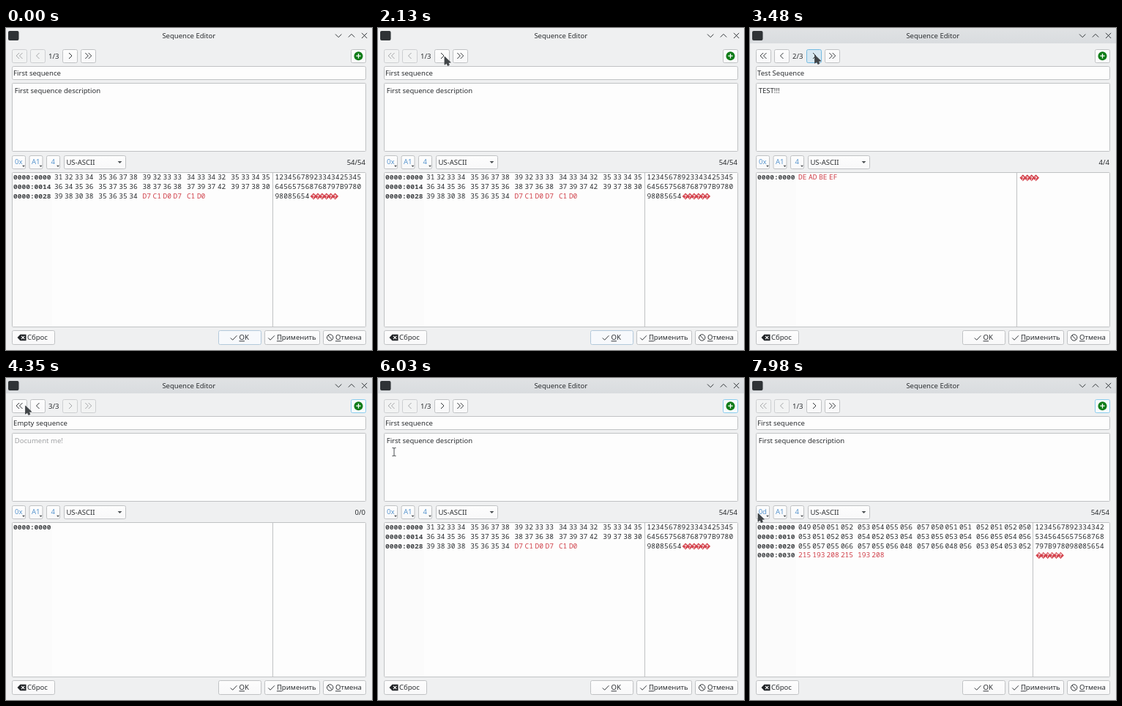
Write an HTML page that moves like this. It is 500x440 px and loops after 8 s.

```html
<!DOCTYPE html>
<html lang="ru">
<head>
<meta charset="utf-8">
<title>Sequence Editor</title>
<style>
html, body { margin: 0; width: 100%; height: 100%; overflow: hidden; background: #eff0f1; }
svg { display: block; width: 500px; height: 440px; }
text { font: 9.54px "Noto Sans", sans-serif; fill: #2b2e31; white-space: pre; }
.mono { font-family: "Noto Sans Mono", monospace; }
.bold { font-weight: 600; fill: #404346; }
.tool { fill: #5b97cf; }
.bad { fill: #cf3f49; }
.hint { fill: #a0a2a4; }
.u { text-decoration: underline; }
.line { fill: none; stroke: #33373a; stroke-width: 1; }
</style>
</head>
<body>
<svg id="stage" viewBox="0 0 500 440">
  <defs>
    <linearGradient id="bar" x1="0" y1="0" x2="0" y2="1">
      <stop offset="0" stop-color="#e0e2e4"/><stop offset="1" stop-color="#d9dcdf"/>
    </linearGradient>
    <linearGradient id="face" x1="0" y1="0" x2="0" y2="1">
      <stop offset="0" stop-color="#fdfdfd"/><stop offset="1" stop-color="#f8f8f9"/>
    </linearGradient>
  </defs>
  <g id="view"></g>
  <g id="arrow"><path d="M0 0V11.2L2.7 9.2 4.3 12.5 6.4 11.6 5 8.4 8.3 8Z" fill="#414548" stroke="#414548" stroke-width=".8" stroke-linejoin="round"/></g>
  <g id="beam"><path d="M-2.5 -5.5H-1Q0 -5.5 0 -4.5Q0 -5.5 1 -5.5H2.5M0 -4.5V4.5M-2.5 5.5H-1Q0 5.5 0 4.5Q0 5.5 1 5.5H2.5" fill="none" stroke="#4b4f52"/></g>
</svg>
<script>
const LOOP = 8000;
const $ = id => document.getElementById(id);
const bytes = s => [...s].map(c => c.charCodeAt(0));

const pages = [
  { name: 'First sequence', note: 'First sequence description',
    data: [...bytes('12345678923343425345' + '645657568768797B9780' + '98085654'),
           0xD7, 0xC1, 0xD0, 0xD7, 0xC1, 0xD0] },
  { name: 'Test Sequence', note: 'TEST!!!', data: [0xDE, 0xAD, 0xBE, 0xEF] },
  { name: 'Empty sequence', note: '', data: [] }
];

const modes = {
  hex: { label: '0x', base: 16, digits: 2, row: 20, cell: 14, group: 60.3, split: 364.5 },
  dec: { label: '0d', base: 10, digits: 3, row: 16, cell: 19.3, group: 81, split: 386.5 }
};

const text = (x, y, s, cls = '', anchor = 'start') =>
  `<text x="${x}" y="${y}" class="${cls}" text-anchor="${anchor}">${s}</text>`;
const line = (d, extra = '') => `<path class="line" d="${d}" ${extra}/>`;
const box = (x, y, w, h, fill, stroke, r = 2) =>
  `<rect x="${x + .5}" y="${y + .5}" width="${w}" height="${h}" rx="${r}" fill="${fill}" stroke="${stroke}"/>`;

function button(x, y, w, h, look = '') {
  const [fill, stroke] = {
    off: ['#f2f3f3', '#cdcfd1'],
    hot: ['#d7e8f2', '#74bbe2'],
    focus: ['#f6fafc', '#8accee'],
    main: ['#f7f9fc', '#b3c9db']
  }[look] || ['url(#face)', '#c0c2c4'];
  return box(x, y, w, h, fill, stroke);
}

// One or two chevrons; dir is -1 for left, 1 for right.
function chevrons(cx, dir, count, off) {
  let d = '';
  for (let i = 0; i < count; i++) {
    const x = cx + (count > 1 ? (i - .5) * 4.4 : 0);
    d += `M${x - 2 * dir} 34l${4 * dir} 4l${-4 * dir} 4`;
  }
  return line(d, off ? 'style="stroke:#a5a7a9"' : '');
}

function titleBar(active) {
  return `<rect width="500" height="440" fill="#eff0f1"/>` +
    `<rect width="500" height="21" fill="${active ? 'url(#bar)' : '#eff0f1'}"/>` +
    `<rect x="3" y="4" width="14.5" height="13" rx="2" fill="#2f3336"/>` +
    text(249.8, 14, 'Sequence Editor', '', 'middle') +
    line('M450 8.5l4.2 4.2 4.2-4.2M467.8 12.5l4.2-4.2 4.2 4.2M486 6.8l7.2 7.2m0-7.2l-7.2 7.2');
}

function navigation(s) {
  const first = s.page === 0, last = s.page === 2;
  const next = last ? 'off' : s.focus === 'next' ? 'hot' : '';
  return button(8, 29, 20, 18, first ? 'off' : '') + chevrons(18.3, -1, 2, first) +
    button(33, 29, 20, 18, first ? 'off' : '') + chevrons(43.5, -1, 1, first) +
    text(58, 42, `${s.page + 1}/3`) +
    button(77, 29, 20, 18, next) + chevrons(88, 1, 1, last) +
    button(102, 29, 20, 18, last ? 'off' : '') + chevrons(112.5, 1, 2, last) +
    button(471, 29, 20, 18, s.focus === 'add' ? 'focus' : '') +
    '<circle cx="481.5" cy="38.2" r="6" fill="#107c18"/>' +
    '<path d="M478.3 38.2h6.4m-3.2-3.2v6.4" stroke="#fff" stroke-width="1.3"/>';
}

function fields(p) {
  return box(8, 52, 483, 18, '#fdfdfd', '#c0c2c4') + text(10.1, 65, p.name) +
    box(8, 75, 483, 93, '#fdfdfd', '#c0c2c4', 1) +
    text(11.7, 89.2, p.note || 'Document me!', p.note ? '' : 'hint');
}

function tools(p, mode) {
  const n = p.data.length;
  return [mode.label, 'A1', '4'].map((label, i) => {
    const x = 8 + i * 23.5;
    return button(x, 174, 18, 18) + text(x + 9.3, 186.3, label, 'tool', 'middle') +
      `<path d="M${x + 14} 187.8h4l-2 2.2z" fill="#4b4f52"/>`;
  }).join('') +
    button(79, 174, 84, 18) + text(82.4, 186.7, 'US-ASCII') +
    '<path d="M152.6 182h5.8l-2.9 3z" fill="#4b4f52"/>' +
    text(491, 186.7, `${n}/${n}`, '', 'end');
}

function unknown(x, y) {
  return `<path d="M${x} ${y}l4.5-4.5 4.5 4.5-4.5 4.5z" fill="#d4434d"/>` +
    `<text x="${x + 4.5}" y="${y + 2.8}" text-anchor="middle" style="font-size:7.5px;font-weight:600;fill:#fff">?</text>`;
}

function dump(data, m) {
  let out = box(8, 197, 483, 211, '#fdfdfd', '#c0c2c4', 1) +
    '<rect x="9" y="198" width="54" height="210" fill="#fbfbfb"/>' +
    `<path d="M${m.split} 198V408" stroke="#c0c2c4"/>`;
  const rows = Math.max(1, Math.ceil(data.length / m.row));
  for (let r = 0; r < rows; r++) {
    const mid = 204 + r * 12.6, y = mid + 3.3;
    const offset = (r * m.row).toString(16).toUpperCase().padStart(4, '0');
    out += text(10, y, '0000:' + offset, 'mono bold');
    data.slice(r * m.row, (r + 1) * m.row).forEach((b, i) => {
      const bad = b > 127;
      const x = 66 + Math.floor(i / 4) * m.group + (i % 4) * m.cell;
      const ax = m.split + 2.9 + i * 5.9;
      out += text(x, y, b.toString(m.base).toUpperCase().padStart(m.digits, '0'), bad ? 'mono bad' : 'mono');
      out += bad ? unknown(ax + 1, mid + .7) : text(ax, y, String.fromCharCode(b), 'mono');
    });
  }
  return out;
}

function footer(active) {
  const key = (u, rest) => `<tspan class="u">${u}</tspan>${rest}`;
  return button(8, 413, 58, 19) +
    '<path d="M15.5 423l4-4.3h8v8.6h-8z" fill="#232629"/>' +
    '<path d="M21 420.8l4.3 4.4m0-4.4l-4.3 4.4" stroke="#fff" stroke-width="1.2"/>' +
    text(29, 426.4, 'Сброс') +
    button(290, 413, 58, 19, active ? '' : 'main') + line('M306.8 423.5l2.8 2.8 5.8-6') +
    text(318.5, 426.4, key('O', 'K')) +
    button(353, 413, 75, 19) + line('M358.3 423.5l2.8 2.8 5.8-6') +
    text(369.9, 426.4, key('П', 'рименить')) +
    button(433, 413, 58, 19) +
    '<circle class="line" cx="442.7" cy="423" r="4.2"/>' + line('M439.8 420l5.8 6') +
    text(450, 426.4, key('О', 'тмена'));
}

function stateAt(t) {
  return {
    page: t < 2490 ? 0 : t < 3630 ? 1 : t < 4950 ? 2 : 0,
    active: t >= 2430,
    focus: t < 2430 ? '' : t < 3630 ? 'next' : 'add',
    mode: t < 6960 ? 'hex' : 'dec'
  };
}

// Pointer stops: time, x, y
const stops = [
  [0, 530, 330], [30, 505, 300], [570, 118, 24], [810, 112, 26], [1260, 91, 39],
  [2430, 91, 39], [2700, 88.5, 37], [4080, 88.5, 37], [4350, 26.5, 38], [4560, 20, 38],
  [5850, 20, 38], [6030, 22, 101], [6540, 11, 185], [LOOP, 11, 185]
];

function pointerAt(t) {
  const i = stops.findIndex(s => s[0] > t);
  const [t0, x0, y0] = stops[i - 1], [t1, x1, y1] = stops[i];
  const k = (t - t0) / (t1 - t0), e = k * k * (3 - 2 * k);
  return [x0 + (x1 - x0) * e, y0 + (y1 - y0) * e];
}

let shown = '';
function draw(t) {
  const s = stateAt(t), id = JSON.stringify(s);
  if (id !== shown) {
    shown = id;
    const p = pages[s.page], m = modes[s.mode];
    $('view').innerHTML = titleBar(s.active) + navigation(s) + fields(p) +
      tools(p, m) + dump(p.data, m) + footer(s.active);
  }
  const [x, y] = pointerAt(t);
  const typing = x > 8 && x < 492 && (y > 52 && y < 71 || y > 75 && y < 169);
  for (const [name, on] of [['arrow', !typing], ['beam', typing]]) {
    $(name).setAttribute('transform', `translate(${x} ${y})`);
    $(name).style.display = on ? '' : 'none';
  }
}

const start = performance.now();
function tick() {
  draw((performance.now() - start) % LOOP);
  requestAnimationFrame(tick);
}
draw(0);
requestAnimationFrame(tick);
</script>
</body>
</html>
```
